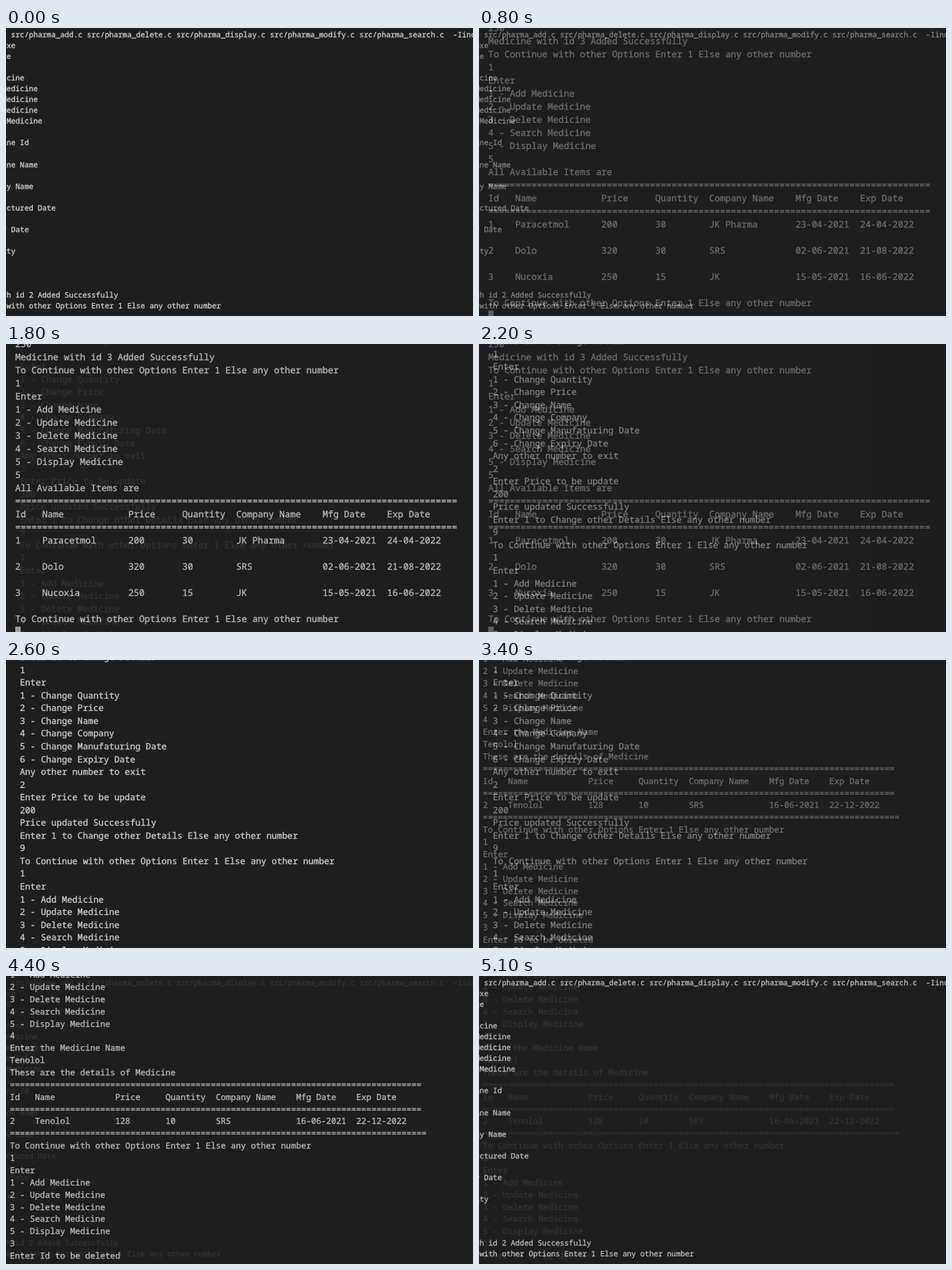
Animation, 606 px wide and 374 px high, one loop 5200 ms. Source, as an HTML page:

```html
<!DOCTYPE html>
<html lang="en">
<head>
<meta charset="utf-8">
<title>Terminal slideshow</title>
<style>
  html, body { margin: 0; width: 100%; height: 100%; overflow: hidden; background: #1e1e1e; }
  .slide { position: absolute; inset: 0; overflow: hidden; background: #1e1e1e; }
  pre {
    position: absolute; margin: 0; color: #ccc; -webkit-text-stroke: 0.3px #ccc;
    font-family: "Noto Sans Mono", "DejaVu Sans Mono", monospace;
    text-rendering: geometricPrecision; font-variant-ligatures: none;
  }
  .cursor { background: #aeaeae; }
</style>
</head>
<body>
<script>
const STEP = 100, HOLD_STEPS = 4, FADE_STEPS = 9, SLIDE_MS = 1300;

const menu = ['1 - Add Medicine', '2 - Update Medicine', '3 - Delete Medicine',
  '4 - Search Medicine', '5 - Display Medicine'];
const proceed = 'To Continue with other Options Enter 1 Else any other number';
const rule = '='.repeat(82);
const widths = [5, 16, 10, 10, 16, 12, 10];
const row = (...cells) => cells.map((cell, i) => cell.padEnd(widths[i])).join('');
const header = row('Id', 'Name', 'Price', 'Quantity', 'Company Name', 'Mfg Date', 'Exp Date');
const sources = ['add', 'delete', 'display', 'modify', 'search'].map(n => `src/pharma_${n}.c`).join(' ');

// x: left edge, y: centre of the first line, advance: character width, pitch: line distance
const slides = [
  { x: -68.8, y: 8.7, advance: 5.8, pitch: 14.08, lines: [
    'gcc   main.c ' + sources + '  -Iinc -o all.exe', 'gcc -o all.exe', './all.exe'.padStart(13),
    'Enter', ...menu, '1',
    'Enter Medicine Id', '2', 'Enter Medicine Name', '', 'Enter Company Name', '',
    'Enter Manufactured Date', '', 'Enter Expiry Date', '', 'Enter Quantity', '',
    'Enter Price', '', 'Medicine with id 2 Added Successfully', proceed] },
  { x: 12, y: 0.7, advance: 7, pitch: 17, lines: [
    '250', 'Medicine with id 3 Added Successfully', proceed, '1', 'Enter', ...menu, '5',
    'All Available Items are', rule, header, rule,
    row('1', 'Paracetmol', '200', '30', 'JK Pharma', '23-04-2021', '24-04-2022'), '',
    row('2', 'Dolo', '320', '30', 'SRS', '02-06-2021', '21-08-2022'), '',
    row('3', 'Nucoxia', '250', '15', 'JK', '15-05-2021', '16-06-2022'), '',
    proceed, '<span class="cursor"> </span>'] },
  { x: 18, y: -2.6, advance: 6.81, pitch: 16.55, lines: [
    'Enter Id to Change Details', '1', 'Enter', '1 - Change Quantity', '2 - Change Price',
    '3 - Change Name', '4 - Change Company', '5 - Change Manufaturing Date',
    '6 - Change Expiry Date', 'Any other number to exit', '2', 'Enter Price to be update',
    '200', 'Price updated Successfully', 'Enter 1 to Change other Details Else any other number',
    '9', proceed, '1', 'Enter', ...menu] },
  { x: 5, y: -0.9, advance: 6.52, pitch: 15.86, lines: [
    ...menu, '4', 'Enter the Medicine Name', 'Tenolol', 'These are the details of Medicine',
    rule, header, rule,
    row('2', 'Tenolol', '128', '10', 'SRS', '16-06-2021', '22-12-2022'), rule + '=',
    proceed, '1', 'Enter', ...menu, '3', 'Enter Id to be deleted'] },
];

const layers = slides.map(({ x, y, advance, pitch, lines }) => {
  const layer = document.createElement('div');
  const text = document.createElement('pre');
  layer.className = 'slide';
  text.innerHTML = lines.join('\n');
  text.style.cssText = `left:${x}px; top:${y - pitch / 2}px; ` +
    `font-size:${advance / 0.6}px; line-height:${pitch}px`;
  layer.append(text);
  document.body.append(layer);
  return layer;
});

function draw() {
  const time = performance.now() % (SLIDE_MS * layers.length);
  const current = Math.floor(time / SLIDE_MS);
  const next = (current + 1) % layers.length;
  const fade = Math.max(0, Math.floor(time % SLIDE_MS / STEP) - HOLD_STEPS) / FADE_STEPS;
  layers.forEach((layer, i) => {
    layer.style.zIndex = i === next ? 2 : 1;
    layer.style.opacity = i === current ? 1 : i === next ? fade : 0;
  });
  requestAnimationFrame(draw);
}
draw();
</script>
</body>
</html>
```
